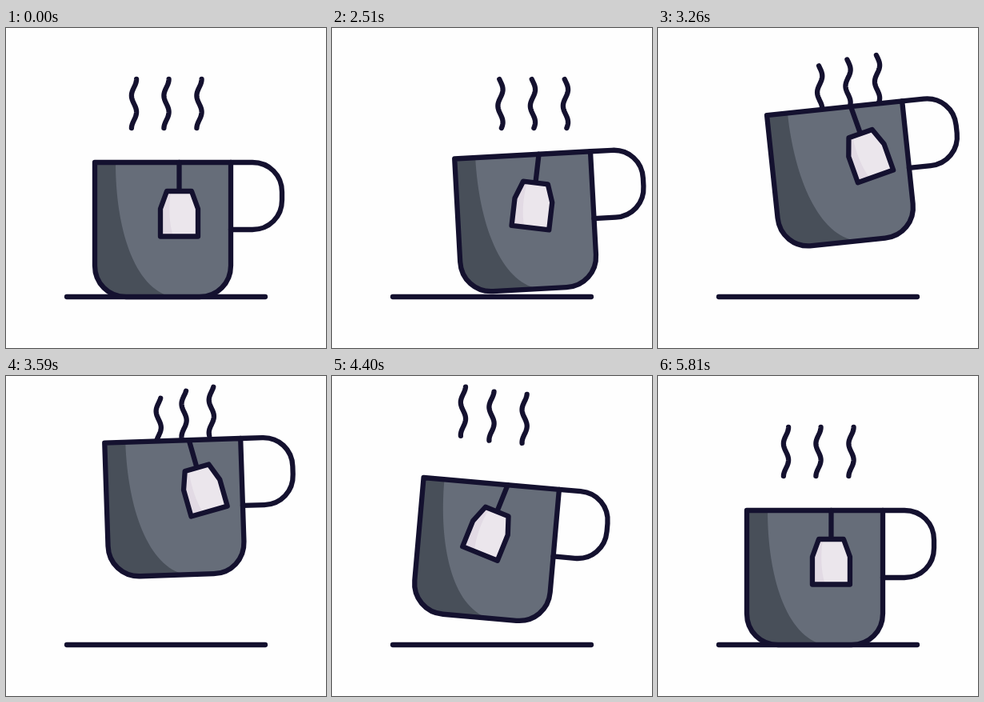
An HTML page for the animation above (5.84 s loop, 400 by 400 pixels).

```html
<!DOCTYPE html>
<html lang="en">
<head>
<meta charset="utf-8">
<title>Cup of tea</title>
<style>
  html, body { margin: 0; width: 100%; height: 100%; overflow: hidden; background: #fefefe; }
  svg { display: block; width: 100%; height: 100%; }
  .line { fill: none; stroke: #14112f; stroke-width: 6.3; stroke-linecap: round; stroke-linejoin: round; }
</style>
</head>
<body>
<svg viewBox="0 0 400 400">
  <path class="line" d="M76 336H324"/>
  <path class="line steam"/>
  <path class="line steam"/>
  <path class="line steam"/>
  <g id="cup">
    <path fill="#666d79" d="M111 168H281V297Q281 336 242 336H150Q111 336 111 297Z"/>
    <path fill="#484f59" d="M111 168H137C137 250 160 325 207 336H150Q111 336 111 297Z"/>
    <path class="line" d="M281 168H308C329 168 345 184 345 205V215C345 236 329 252 308 252H281"/>
    <path class="line" d="M111 168H281V297C281 319 264 336 242 336H150C128 336 111 319 111 297Z"/>
    <g id="bag">
      <path class="line" d="M216.5 168V204"/>
      <path fill="#ebe6ec" d="M201 204H232L240 226V260.5H193V226Z"/>
      <path fill="#e2dae4" d="M201 204H206C203 225 204 245 209 260.5H193V226Z"/>
      <path class="line" d="M201 204H232L240 226V260.5H193V226Z"/>
    </g>
  </g>
</svg>
<script>
const LOOP = 5840, START = 2030;
const cup = document.getElementById('cup');
const bag = document.getElementById('bag');
const wisps = [...document.querySelectorAll('.steam')].map((path, i) => ({
  path,
  x: [160, 200.5, 241.5][i],
  lag: [330, 120, 0][i] // the wisp nearest the handle leads
}));

const progress = (t, from, to) => Math.min(1, Math.max(0, (t - from) / (to - from)));
const smooth = u => u * u * (3 - 2 * u);

// Eases from 0 at `start` through each [time, value] in turn.
function swing(t, start, ...stops) {
  let time = start, value = 0, result = 0;
  for (const [nextTime, nextValue] of stops) {
    result += (nextValue - value) * smooth(progress(t, time, nextTime));
    [time, value] = [nextTime, nextValue];
  }
  return result;
}

function wave(x, y, cycles) {
  let d = 'M';
  for (let s = 0; s <= 61; s++) {
    const sway = 3.1 * Math.cos(2 * Math.PI * (s / 41 + cycles));
    d += `${(x + sway).toFixed(2)} ${(y + s).toFixed(2)} `;
  }
  return d;
}

function draw(now) {
  const t = now % LOOP;

  const x = swing(t, START, [2650, 53.5], [4200, -5], [4930, 0]);
  const y = swing(t, 2200, [3770, -90.5], [4850, 0]);
  const tilt = swing(t, START, [3060, -6.9], [4280, 5.5], [4930, 0]);
  cup.setAttribute('transform', `translate(${x} ${y}) rotate(${tilt} 196 252)`);

  const sway = swing(t, START, [2450, 10], [3450, -16], [4400, 17], [5180, -9.5], [5520, 3], [5830, 0]);
  bag.setAttribute('transform', `rotate(${sway} 216.5 168)`);

  const cycles = 4 * (1 - (1 - progress(t, START, 5600)) ** 1.3);
  for (const wisp of wisps) {
    const { lag } = wisp;
    const drift = swing(t, START, [2600, 54], [4150 + 2 * lag, -1], [5200, 0]);
    const rise = swing(t, 2650 + lag / 3, [3800 + lag, -55], [5630, 0]);
    wisp.path.setAttribute('d', wave(wisp.x + drift, 64 + rise, cycles));
  }
  requestAnimationFrame(draw);
}
draw(performance.now());
</script>
</body>
</html>
```
